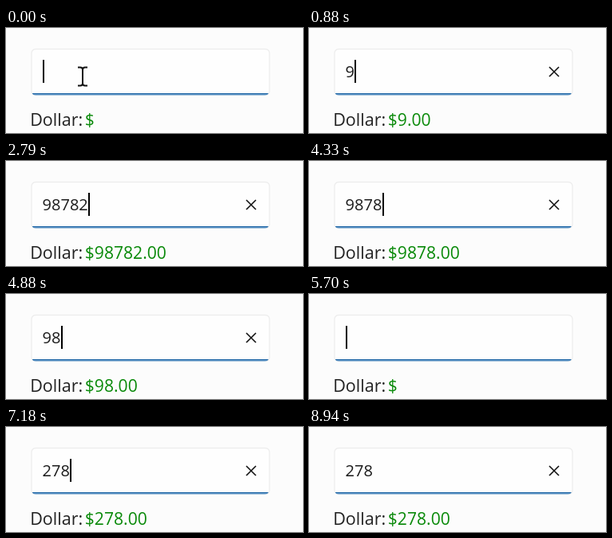
Recreate the animation shown at these times as an HTML page. Size 372 by 132 pixels, loop 8.97 s.

```html
<!DOCTYPE html>
<html lang="en">
<head>
<meta charset="utf-8">
<title>Currency input</title>
<style>
  html, body { margin: 0; width: 100%; height: 100%; overflow: hidden; background: #fcfcfc; }
  svg { display: block; }
  text { font-family: "Open Sans", "Noto Sans", sans-serif; white-space: pre; }
  .line { fill: none; stroke: #111; stroke-width: 1.6; }
</style>
</head>
<body>
<svg width="372" height="132" viewBox="0 0 372 132">
  <clipPath id="inside"><rect x="32.5" y="26" width="296.5" height="59" rx="5"/></clipPath>
  <rect x="32" y="26.5" width="298" height="58" rx="5" fill="#fefefe" stroke="#ededed" stroke-width="1.3"/>
  <g clip-path="url(#inside)">
    <rect x="32" y="82" width="298" height="3" fill="#a9c6de"/>
    <rect x="32" y="82" width="298" height="2" fill="#5b92c4"/>
    <rect x="32" y="82" width="298" height="1" fill="#1c64a4"/>
  </g>
  <text id="value" x="45.6" y="62" font-size="20" fill="#1c1c1c"></text>
  <rect id="caret" y="40" width="2" height="29" fill="#000"/>
  <path id="clear" class="line" d="M301 49l12 12m0-12l-12 12"/>
  <path id="pointer" class="line" style="stroke-width:2"
    d="M-6-11.5h3q3 0 3 3v17q0 3-3 3h-3M6-11.5h-3q-3 0-3 3M0 8.5q0 3 3 3h3"/>
  <text x="30.2" y="122.6" font-size="21.5" fill="#222">Dollar:</text>
  <text id="amount" x="98.8" y="122.6" font-size="21.1" fill="#0a8a0a"></text>
</svg>
<script>
const LOOP = 8970, DIGIT = 11.44;
const [value, caret, clear, pointer, amount] =
  ["value", "caret", "clear", "pointer", "amount"].map(id => document.getElementById(id));

// Each entry: start time in ms, then the state from there on
const typed = [
  [0, ""], [880, "9"], [1360, "98"], [1700, "987"], [2060, "9878"], [2730, "98782"],
  [4330, "9878"], [4640, "987"], [4880, "98"], [5000, "9"], [5700, ""],
  [6390, "2"], [6760, "27"], [7120, "278"]
];
const caretOn = [[0, true], [210, false], [880, true], [8700, false]];
const pointerAt = [[0, [96, 61]], [360, [112, 44]], [440, [129, 26]], [520, null]];

const at = (track, t) => track.findLast(([start]) => start <= t)[1];
const show = (el, on) => el.setAttribute("visibility", on ? "visible" : "hidden");

function draw() {
  const t = performance.now() % LOOP;
  const digits = at(typed, t), place = at(pointerAt, t);
  value.textContent = digits;
  amount.textContent = "$" + (digits && Number(digits).toFixed(2));
  caret.setAttribute("x", Math.round(46 + digits.length * DIGIT));
  show(caret, at(caretOn, t));
  show(clear, digits);
  show(pointer, place);
  if (place) pointer.setAttribute("transform", `translate(${place})`);
  requestAnimationFrame(draw);
}
draw();
</script>
</body>
</html>
```
